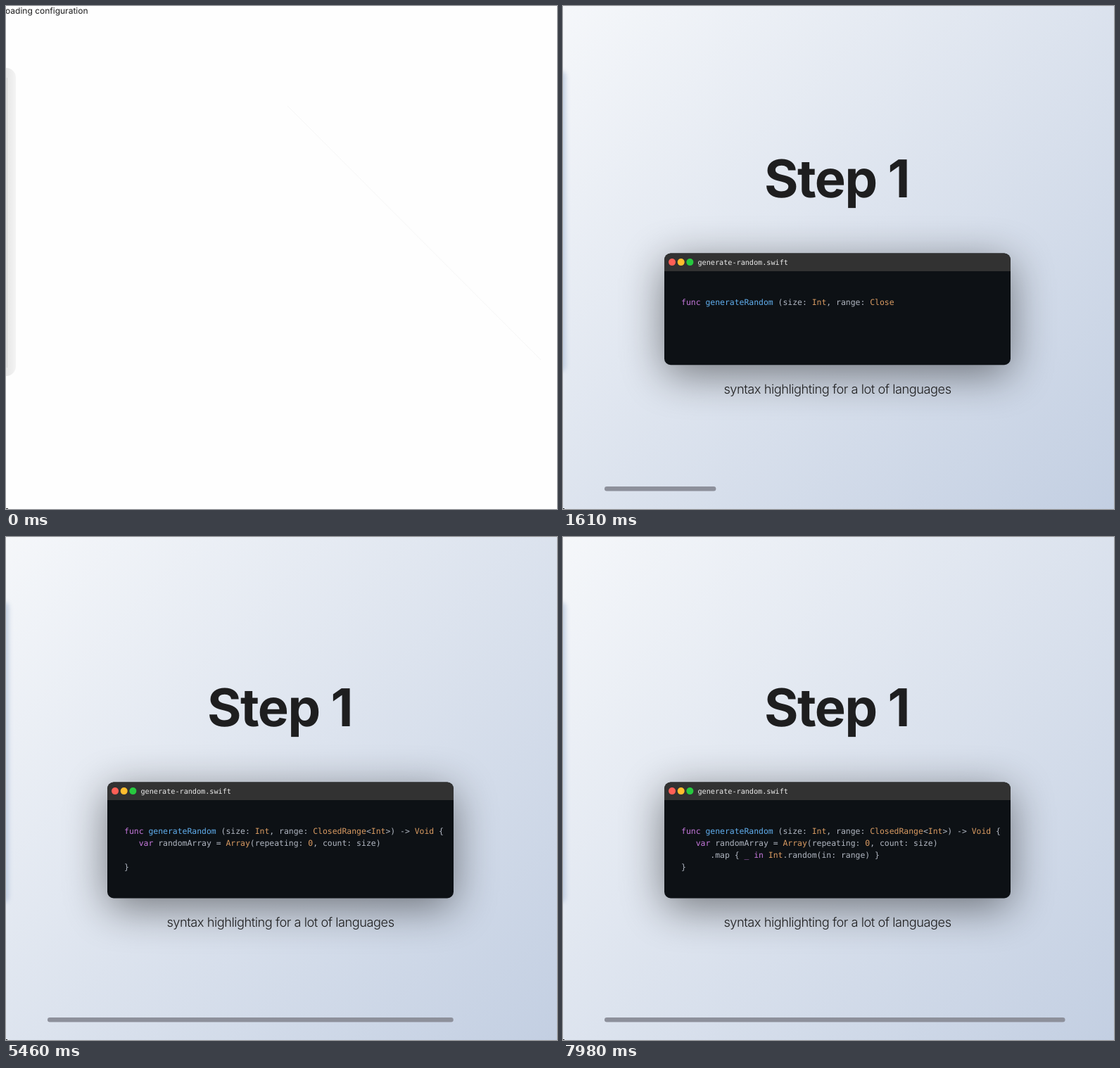
These frames come from a looping animation (783 px wide and 715 px high, 8000 ms). An HTML page:

```html
<!DOCTYPE html>
<html lang="en">
<head>
<meta charset="utf-8">
<title>Step 1</title>
<style>
html, body { margin: 0; width: 100%; height: 100%; overflow: hidden; background: #fefefe; }
svg { display: block; position: absolute; left: 0; top: 0; }
#scene { background: linear-gradient(135deg, #f5f7fa, #c3cfe2); }
text { white-space: pre; text-rendering: geometricPrecision; }
.sans { font-family: Inter, sans-serif; fill: #1e1e1f; }
.mono { font-family: "DejaVu Sans Mono", monospace; }
#title { font-size: 74px; font-weight: 700; letter-spacing: -.02em; }
#caption { font-size: 18.2px; font-weight: 300; letter-spacing: -.025em; }
#code text { font-size: 11.43px; }
#shadow { filter: drop-shadow(0 13px 30px rgba(0, 0, 0, .48)); }
#edge { filter: blur(3px); }
</style>
</head>
<body>
<svg id="loading" width="783" height="715">
  <defs>
    <linearGradient id="strip"><stop offset=".7" stop-color="#e4e4e4"/><stop offset="1" stop-color="#f4f4f4"/></linearGradient>
  </defs>
  <rect x="-40" y="88" width="54" height="438" rx="14" fill="url(#strip)"/>
  <path d="M1.5 102V514" stroke="#d4d4d4"/>
  <path d="M400 142L760 503" stroke="#f6f6f6"/>
  <text class="sans" x="116.5" y="11" font-size="12" text-anchor="end">Loading configuration</text>
  <rect y="714" width="3" height="1" fill="#222"/>
</svg>
<svg id="scene" width="783" height="715">
  <rect id="edge" x="-30" y="92" width="34" height="428" rx="8" fill="#b9c8de" opacity=".8"/>
  <text id="title" class="sans" x="389" y="271.5" text-anchor="middle">Step 1</text>
  <rect id="shadow" x="144" width="492" rx="9" fill="#0d1115"/>
  <g id="top">
    <path d="M144 25.5V9a9 9 0 0 1 9-9H627a9 9 0 0 1 9 9V25.5Z" fill="#323232"/>
    <circle cx="155" cy="12.6" r="5" fill="#ff5f56"/>
    <circle cx="167.7" cy="12.6" r="5" fill="#ffbd2e"/>
    <circle cx="180.4" cy="12.6" r="5" fill="#27c93f"/>
    <text class="mono" x="191.5" y="16" font-size="10.16" fill="#ececec">generate-random.swift</text>
    <g id="code"></g>
  </g>
  <text id="caption" class="sans" x="390" y="550.5" text-anchor="middle">syntax highlighting for a lot of languages</text>
  <rect id="bar" x="59" y="683" height="6.4" rx="3.2" fill="#8d909b"/>
  <rect y="714" width="2" height="1" fill="#222"/>
</svg>
<script>
const LOOP = 8000, STEP = 70, CHAR = 35;
const START = 70, INSERT = 3570;
const LINE = 17.1, BAR_WIDTH = 665;
const $ = id => document.getElementById(id);
const clamp = v => Math.max(0, Math.min(1, v));

const COLORS = { k: '#c678dd', f: '#61afef', t: '#d99b62', p: '#b1b7c2' };
const LINES = [
  [['k', 'func'], ['f', ' generateRandom'], ['p', ' (size: '], ['t', 'Int'], ['p', ', range: '],
    ['t', 'ClosedRange'], ['p', '<'], ['t', 'Int'], ['p', '>) -> '], ['t', 'Void'], ['p', ' {']],
  [['k', '   var'], ['p', ' randomArray = '], ['t', 'Array'], ['p', '(repeating: '], ['t', '0'], ['p', ', count: size)']],
  [['p', '      .map { '], ['k', '_ in '], ['t', 'Int'], ['p', '.random(in: range) }']],
  [['p', '}']]
];
const lengthOf = line => line.reduce((sum, [, s]) => sum + s.length, 0);
const [FIRST, SECOND] = LINES.map(lengthOf);

const rows = LINES.map(line => {
  const row = document.createElementNS('http://www.w3.org/2000/svg', 'text');
  row.setAttribute('class', 'mono');
  row.setAttribute('x', 168);
  const spans = line.map(([kind]) => {
    const span = document.createElementNS('http://www.w3.org/2000/svg', 'tspan');
    span.setAttribute('fill', COLORS[kind]);
    row.append(span);
    return span;
  });
  $('code').append(row);
  return { row, spans, line };
});

function type({ spans, line }, count) {
  line.forEach(([, s], i) => {
    spans[i].textContent = s.slice(0, Math.max(0, count));
    count -= s.length;
  });
}

// The standard "ease" curve: cubic-bezier(.25, .1, .25, 1)
function ease(x) {
  let lo = 0, hi = 1;
  for (let i = 0; i < 24; i++) {
    const s = (lo + hi) / 2;
    if (.75 * s * (1 - s) + s ** 3 < x) lo = s; else hi = s;
  }
  return .3 * lo * (1 - lo) ** 2 + 3 * lo * lo * (1 - lo) + lo ** 3;
}

function draw(ms) {
  const t = Math.floor((ms % LOOP) / STEP) * STEP;
  $('loading').style.display = t < START ? '' : 'none';
  $('scene').style.display = t < START ? 'none' : '';

  const typed = Math.floor((t - START) / CHAR);
  const inserted = Math.floor((t - INSERT) / CHAR);
  const tall = inserted > SECOND;
  type(rows[0], typed);
  type(rows[1], inserted);
  type(rows[2], inserted - SECOND - 1);
  type(rows[3], typed - FIRST - 2);

  const y = tall ? 348.5 : 351.5;
  $('top').setAttribute('transform', `translate(0 ${y})`);
  $('shadow').setAttribute('y', y);
  $('shadow').setAttribute('height', tall ? 165 : 158.7);
  rows.forEach(({ row }, i) => row.setAttribute('y', 73.2 + LINE * (i === 3 && !tall ? 2 : i)));

  const shift = tall ? 3 : 0, fade = ease(clamp((t - START) / 500));
  $('title').setAttribute('transform', `translate(0 ${-shift})`);
  $('caption').setAttribute('transform', `translate(0 ${shift})`);
  $('title').setAttribute('opacity', fade);
  $('caption').setAttribute('opacity', fade);
  $('bar').setAttribute('width', BAR_WIDTH * ease(clamp((t + 70) / 9620)));
}

let origin;
function tick(now) {
  origin ??= now;
  draw(now - origin);
  requestAnimationFrame(tick);
}
draw(0);
requestAnimationFrame(tick);
</script>
</body>
</html>
```
